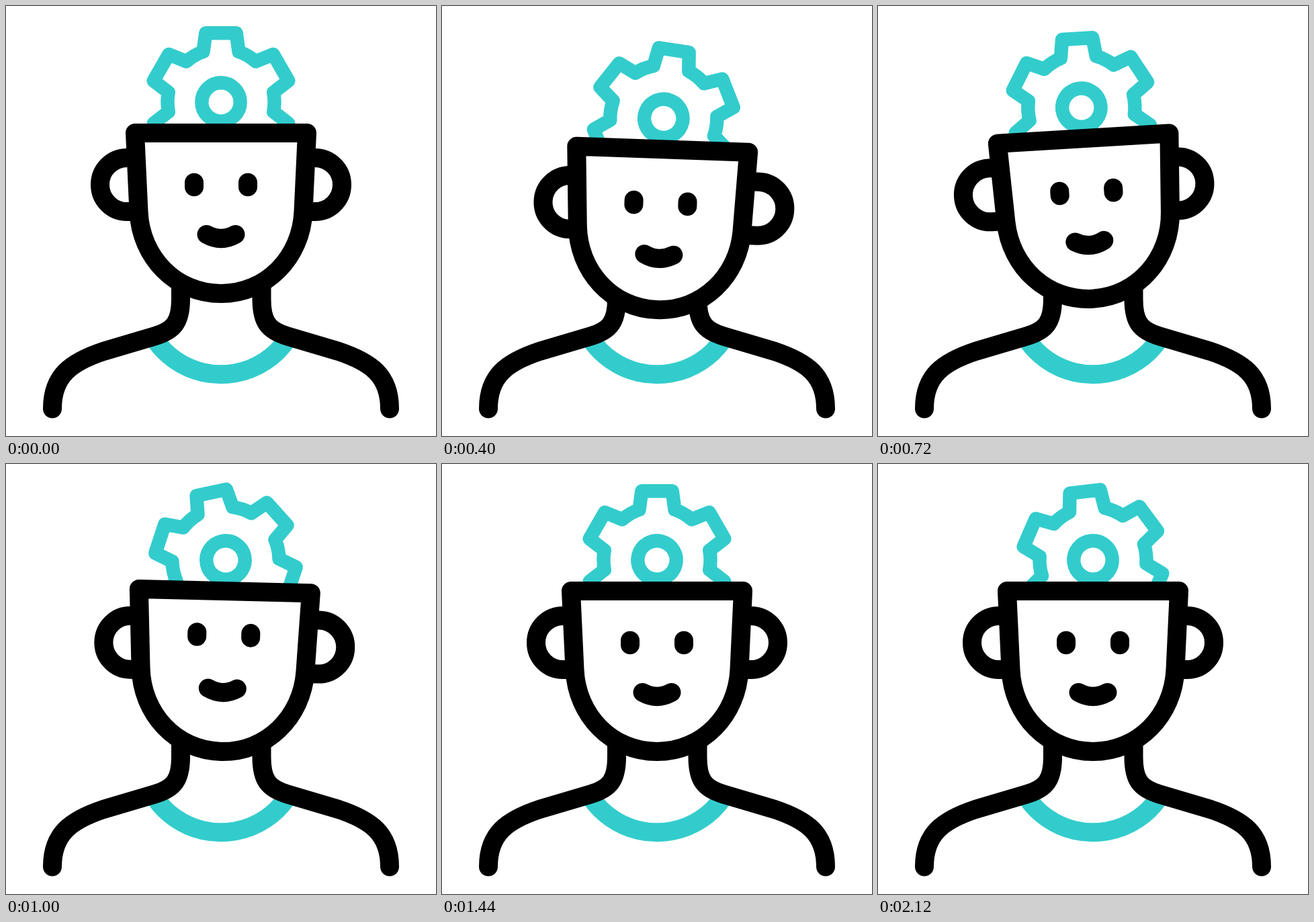
An HTML page with a canvas that plays this animation: 640x640 px, repeating every 2160 ms.

```html
<!DOCTYPE html>
<html lang="en">
<head>
<meta charset="utf-8">
<title>Thinking head</title>
<style>
  html, body { margin: 0; width: 100%; height: 100%; overflow: hidden; background: #fff; }
  canvas { display: block; width: 100vmin; height: 100vmin; }
</style>
</head>
<body>
<canvas id="stage" width="640" height="640"></canvas>
<script>
const ctx = document.getElementById('stage').getContext('2d');
const TEAL = '#33cccc', BLACK = '#000';
const LOOP = 2160, STEP = 40;
const PIVOT = { x: 320, y: 428 };
const GEAR = { x: 320, y: 143 };
const rad = deg => deg * Math.PI / 180;

// Keys are [time, value] pairs joined with a sine ease.
function track(keys) {
  return t => {
    for (let i = 1; i < keys.length; i++) {
      const [t0, a] = keys[i - 1], [t1, b] = keys[i];
      if (t < t1) return a + (b - a) * (1 - Math.cos(Math.PI * (t - t0) / (t1 - t0))) / 2;
    }
    return keys[keys.length - 1][1];
  };
}
const sway = (a, b, c) => track([[0, 0], [294, a], [690, b], [1080, c], [1400, 0]]);

const headDip = track([[0, 0], [440, 24.6], [890, 0]]);
const headTilt = sway(3.07, -3.53, 1.95);
const earX = sway(6.8, -3.6, 2);
const earY = sway(8.1, -1.4, 3.6);
const eyeY = track([[0, 0], [625, 4.6], [1040, -12], [1400, 0]]);
const mouthY = track([[0, 0], [500, 6.4], [1080, -6.6], [1400, 0]]);

function stroke(path, color, width, cap = 'round') {
  ctx.strokeStyle = color;
  ctx.lineWidth = width;
  ctx.lineCap = cap;
  ctx.lineJoin = 'round';
  ctx.stroke(path);
}

function makeGear() {
  const p = new Path2D();
  const point = (x, y, a) => p.lineTo(x * Math.cos(a) - y * Math.sin(a), x * Math.sin(a) + y * Math.cos(a));
  const base = Math.hypot(26.5, 75), half = Math.atan2(26.5, 75);
  for (let i = 0; i < 6; i++) {
    const a = rad(60 * i);
    point(-26.5, -75, a);
    point(-22.7, -102.8, a);
    point(22.7, -102.8, a);
    point(26.5, -75, a);
    const up = a - Math.PI / 2;
    p.arc(0, 0, base, up + half, up + rad(60) - half);
  }
  p.closePath();
  return p;
}

const gear = makeGear();
const ring = new Path2D();
ring.arc(0, 0, 28.7, 0, 2 * Math.PI);

const skull = new Path2D('M192 189H448L442.5 306C439.5 374 387.5 428 320 428C252.5 428 200.5 374 197.5 306Z');
const ears = new Path2D('M200 226H180A40 40 0 0 0 180 306H200M440 226H460A40 40 0 0 1 460 306H440');
const eyes = new Path2D('M280 262.7V269.3M360 262.7V269.3');
const mouth = new Path2D('M298.5 340Q320 352 341.5 340');
const shoulders = new Path2D(
  'M69 599.5C69 550 97 530 145 514L221 491.5C250 483 260 470 260 436V408' +
  'M571 599.5C571 550 543 530 495 514L419 491.5C390 483 380.5 470 380.5 436V408');
const collar = new Path2D();
collar.arc(320, 429, 119.3, rad(35), rad(145));

function shifted(x, y, draw) {
  ctx.save();
  ctx.translate(x, y);
  draw();
  ctx.restore();
}

function drawHead(t) {
  ctx.save();
  ctx.translate(PIVOT.x, PIVOT.y + headDip(t));
  ctx.rotate(rad(headTilt(t)));
  ctx.translate(-PIVOT.x, -PIVOT.y);

  shifted(GEAR.x, GEAR.y, () => {
    ctx.rotate(2 * Math.PI * t / LOOP);
    stroke(gear, TEAL, 20.4);
    stroke(ring, TEAL, 20.4);
  });
  shifted(earX(t), earY(t), () => stroke(ears, BLACK, 28, 'butt'));

  ctx.fillStyle = '#fff';
  ctx.fill(skull);
  stroke(skull, BLACK, 28);
  shifted(0, eyeY(t), () => stroke(eyes, BLACK, 28));
  shifted(0, mouthY(t), () => stroke(mouth, BLACK, 28));
  ctx.restore();
}

function draw(t) {
  ctx.fillStyle = '#fff';
  ctx.fillRect(0, 0, 640, 640);
  stroke(collar, TEAL, 28, 'butt');
  stroke(shoulders, BLACK, 28);
  drawHead(t);
}

const start = performance.now();
function tick() {
  const t = (performance.now() - start) % LOOP;
  draw(Math.floor(t / STEP) * STEP);
  requestAnimationFrame(tick);
}
tick();
</script>
</body>
</html>
```
